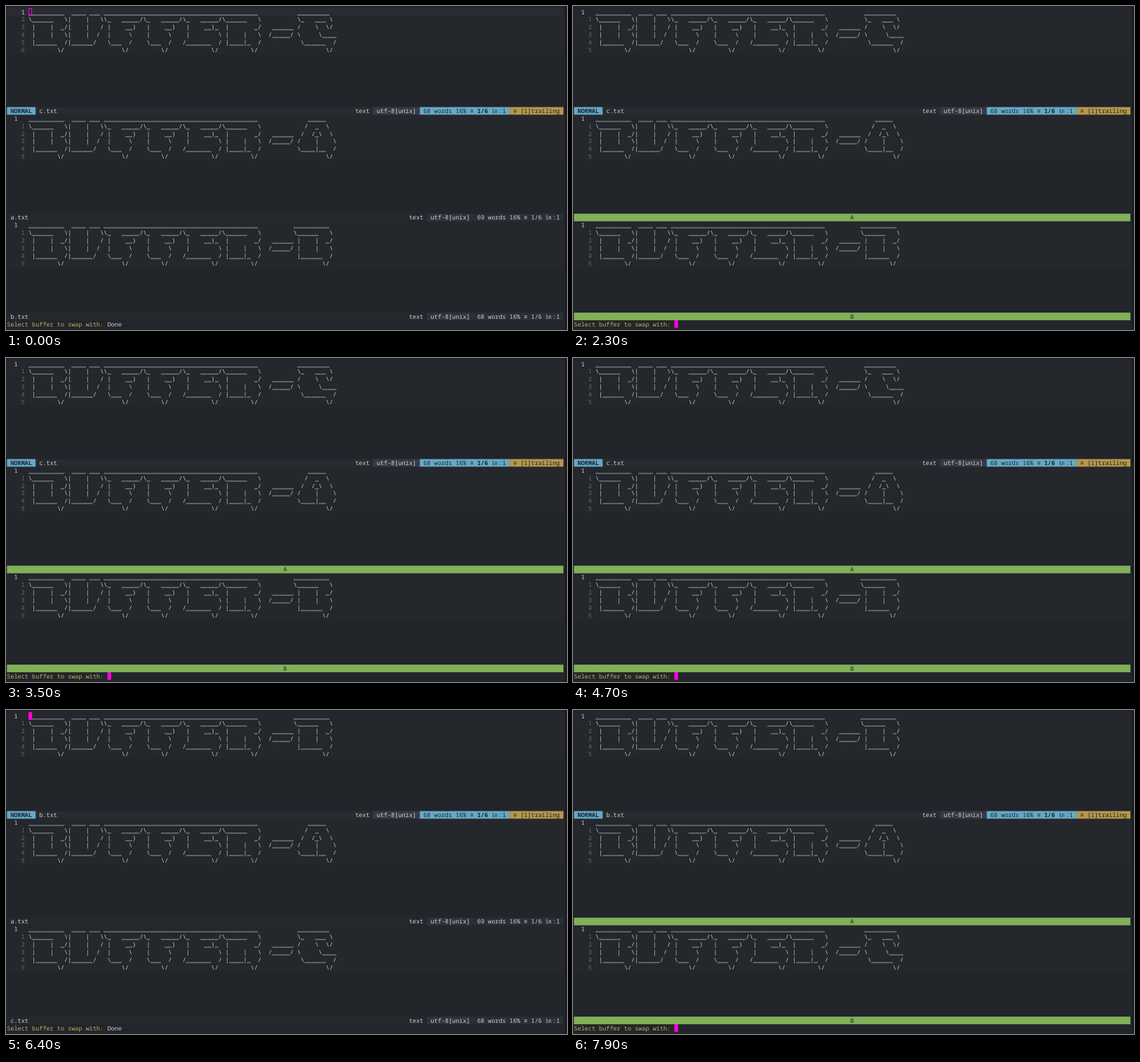
Recreate the animation shown at these times as an HTML page. Size 800 by 463 pixels, loop 8 s.

```html
<!DOCTYPE html>
<html lang="en">
<head>
<meta charset="utf-8">
<title>Swapping buffers</title>
<style>
  html, body { margin: 0; width: 100%; height: 100%; overflow: hidden; background: #22252a; }
  svg { display: block; width: 800px; height: 463px; }
  text {
    font-family: "Noto Sans Mono", "DejaVu Sans Mono", "Noto Sans CJK JP", monospace;
    font-size: 8.533px;
    font-variant-ligatures: none;
    text-rendering: geometricPrecision;
    white-space: pre;
  }
</style>
</head>
<body>
<script>
const COL = 5.12, ROW = 10.88, LEFT = 1.3, TOP = 3, COLS = 155, LOOP = 8000;
const INK = '#d0d2d4', DIM = '#686c73', DARK = '#20242a', BLUE = '#64a8c8',
      GOLD = '#b5964b', GREEN = '#80b05a', PINK = '#ff00e4';

const GLYPHS = {
  B: String.raw`
__________
\______   \
 |    |  _/
 |    |   \
 |______  /
        \/
`,
  U: String.raw`
 ____ ___
|    |   \
|    |   /
|    |  /
|______/

`,
  F: String.raw`
___________
\_   _____/
 |    __)
 |     \
 \___  /
     \/
`,
  E: String.raw`
___________
\_   _____/
 |    __)_
 |        \
/_______  /
        \/
`,
  R: String.raw`
__________
\______   \
 |       _/
 |    |   \
 |____|_  /
        \/
`,
  '-': String.raw`


   ______
  /_____/


`,
  A: String.raw`
    _____
   /  _  \
  /  /_\  \
 /    |    \
 \____|__  /
         \/
`,
  C: String.raw`
 _________
 \_   ___ \
 /    \  \/
 \     \____
  \______  /
         \/
`
};

function banner(word) {
  const rows = Array(6).fill('');
  for (const ch of word) {
    const lines = GLYPHS[ch].split('\n').slice(1, 7);
    const width = Math.max(...lines.map(l => l.length));
    lines.forEach((l, i) => rows[i] += l.padEnd(width));
  }
  return rows.map(r => r.trimEnd());
}

function add(parent, tag, attrs, content) {
  const node = document.createElementNS('http://www.w3.org/2000/svg', tag);
  for (const key in attrs) node.setAttribute(key, attrs[key]);
  if (content) node.textContent = content;
  parent.append(node);
  return node;
}

const x = col => LEFT + col * COL;
const y = row => TOP + row * ROW;

function put(g, col, row, string, fill = INK, weight = 400) {
  add(g, 'text', { x: x(col), y: y(row) + 8.5, fill, 'font-weight': weight },
    string.replace(/ /g, '\u00a0'));
}

function block(g, from, to, row, fill) {
  add(g, 'rect', { x: x(from), y: y(row), width: (to - from) * COL, height: ROW, fill });
}

function pane(g, row, letter, absolute) {
  banner('BUFFER-' + letter).forEach((line, i) => {
    const current = i === 0;
    put(g, current && !absolute ? 2 : 4, row + i,
      String(absolute || current ? i + 1 : i), current ? INK : DIM);
    if (line) put(g, 6, row + i, line);
  });
}

function position(g, col, row, words, fill, weight) {
  put(g, col, row, words + ' words', fill);
  put(g, col + 9, row, '16%', fill);
  put(g, col + 13, row, '≡', fill);
  put(g, col + 15, row, '1/6', fill, weight);
  put(g, col + 19, row, '㏑', fill);
  put(g, col + 21, row, ':1', fill);
}

const wordCount = letter => letter === 'A' ? 69 : 68;
const fileName = letter => letter.toLowerCase() + '.txt';

function activeStatus(g, row, letter) {
  block(g, 0, COLS, row, '#282b31');
  block(g, 0, 8, row, BLUE);
  block(g, 102, 115, row, '#373a44');
  block(g, 115, 140, row, BLUE);
  block(g, 140, COLS, row, GOLD);
  put(g, 1, row, 'NORMAL', DARK, 600);
  put(g, 9, row, fileName(letter));
  put(g, 97, row, 'text');
  put(g, 103, row, 'utf-8[unix]');
  position(g, 116, row, wordCount(letter), DARK, 700);
  put(g, 141, row, '≡', DARK);
  put(g, 143, row, '[1]trailing', DARK);
}

function idleStatus(g, row, letter) {
  block(g, 0, COLS, row, '#25282d');
  block(g, 117, COLS, row, '#2b2e35');
  block(g, 117, 129, row, '#30333b');
  put(g, 1, row, fileName(letter));
  put(g, 112, row, 'text');
  put(g, 118, row, 'utf-8[unix]');
  position(g, 131, row, wordCount(letter), INK, 400);
}

function choiceBar(g, row, label) {
  block(g, 0, COLS, row, GREEN);
  put(g, 77, row, label, DARK);
}

function cursor(g, col, row, hollow) {
  if (!hollow) return block(g, col, col + 1, row, PINK);
  add(g, 'rect', { x: x(col) + .5, y: y(row) + .5, width: COL - 1, height: ROW - 1,
    fill: 'none', stroke: PINK });
}

function screen(svg, { top, bottom, mode }) {
  const g = add(svg, 'g', { display: 'none' });
  const blurred = mode === 'blurred', picking = mode === 'picking';
  if (blurred) block(g, 0, COLS, 0, '#292c32');
  pane(g, 0, top, blurred);
  activeStatus(g, 13, top);
  pane(g, 14, 'A');
  pane(g, 28, bottom);
  put(g, 0, 41, 'Select buffer to swap with:', '#cdab5c');
  if (picking) {
    choiceBar(g, 27, 'A');
    choiceBar(g, 40, 'B');
    cursor(g, 28, 41);
  } else {
    idleStatus(g, 27, 'A');
    idleStatus(g, 40, bottom);
    put(g, 28, 41, 'Done');
    cursor(g, 6, 0, blurred);
  }
  return g;
}

const steps = [
  { at: 0, top: 'C', bottom: 'B', mode: 'blurred' },
  { at: 500, top: 'C', bottom: 'B', mode: 'editing' },
  { at: 2100, top: 'C', bottom: 'B', mode: 'picking' },
  { at: 5000, top: 'B', bottom: 'C', mode: 'editing' },
  { at: 6500, top: 'B', bottom: 'C', mode: 'picking' }
];

const svg = add(document.body, 'svg', { viewBox: '0 0 800 463' });
add(svg, 'rect', { width: 800, height: 463, fill: '#22252a' });
for (const row of [0, 14, 28])
  add(svg, 'rect', { y: y(row), width: 797, height: 6 * ROW, fill: '#24272c' });
add(svg, 'rect', { x: 797.5, width: 2.5, height: 463, fill: '#191b1f' });
const screens = steps.map(step => screen(svg, step));

const start = performance.now();
function frame() {
  const t = (performance.now() - start) % LOOP;
  const now = steps.findLastIndex(step => step.at <= t);
  screens.forEach((g, i) => g.setAttribute('display', i === now ? 'inline' : 'none'));
  requestAnimationFrame(frame);
}
frame();
</script>
</body>
</html>
```
